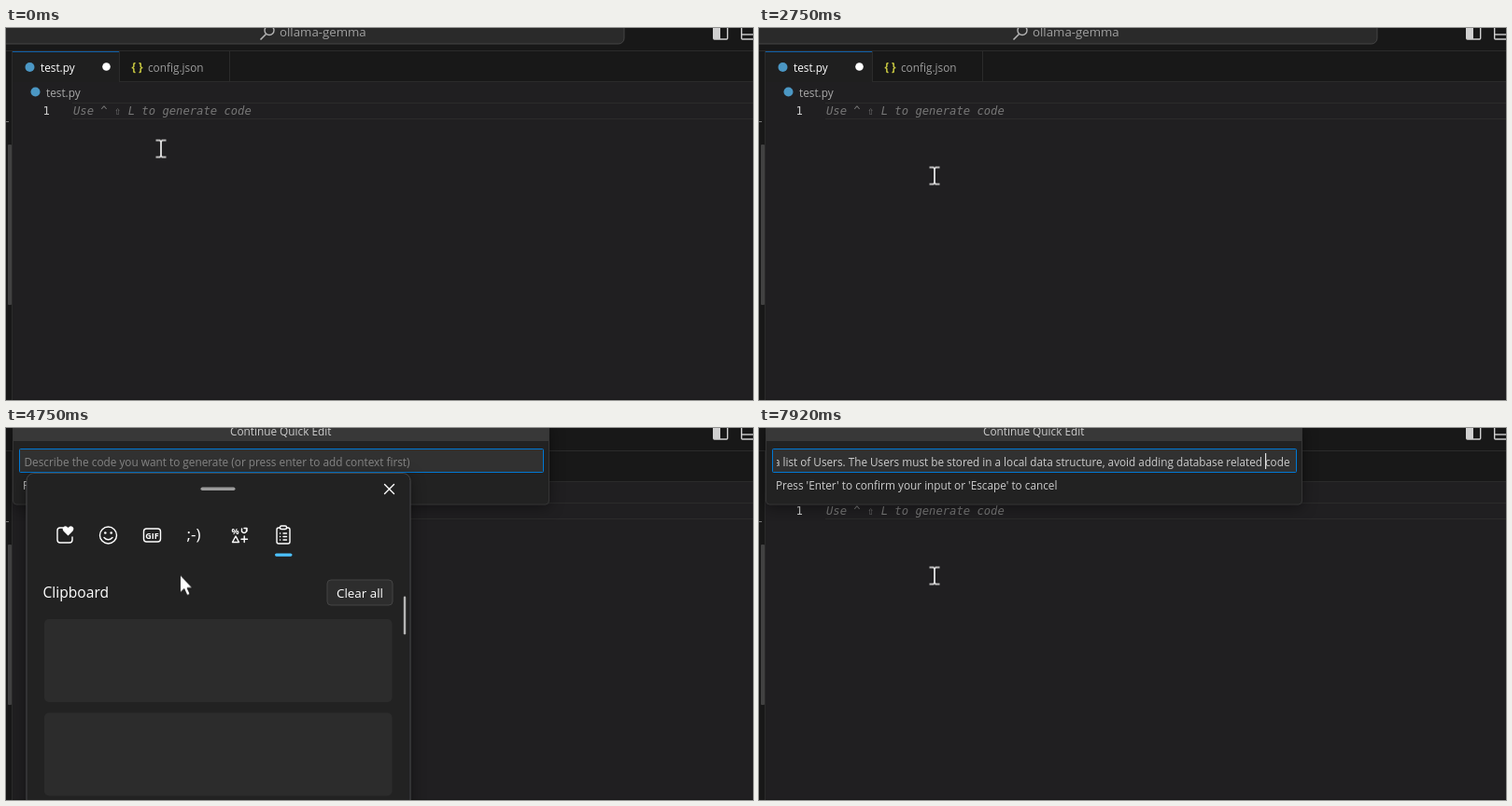
Write an HTML page that moves like this. It is 800 px wide and 399 px high and loops after 8 s.

```html
<!DOCTYPE html>
<html lang="en">
<head>
<meta charset="utf-8">
<title>Editor quick edit</title>
<style>
  html, body { margin: 0; width: 100%; height: 100%; overflow: hidden; background: #181818; }
  svg { display: block; width: 100%; height: 100%; }
  text { font: 11.8px "Open Sans", "Noto Sans", sans-serif; white-space: pre; }
  .mono { font-family: "DejaVu Sans Mono", monospace; font-size: 12.2px; }
  .line { fill: none; stroke: #fff; stroke-width: 1.4; stroke-linecap: round; stroke-linejoin: round; }
  .rule { fill: none; stroke: #2b2b2b; }

  .search, .dialog, .prompt, .pasted, .caret, .entries, .beam, .arrow { animation: 8s step-end infinite; }
  .search { animation-name: search; }
  .dialog { animation-name: dialog; }
  .prompt { animation-name: prompt; }
  .pasted { animation-name: pasted; }
  .caret { animation-name: caret; }
  .entries { animation-name: entries; }
  .beam { animation-name: beam; }
  .arrow { animation-name: arrow; }
  .panel { animation: panel 8s linear infinite; }
  .mouse { animation: mouse 8s ease-in-out infinite; }

  @keyframes search { 0% { opacity: 1 } 37.25%, 100% { opacity: 0 } }
  @keyframes dialog { 0% { opacity: 0 } 37.25%, 100% { opacity: 1 } }
  @keyframes prompt { 0% { opacity: 1 } 79.75%, 100% { opacity: 0 } }
  @keyframes pasted { 0% { opacity: 0 } 79.75%, 100% { opacity: 1 } }
  @keyframes entries { 0% { opacity: 0 } 64.625%, 100% { opacity: 1 } }
  @keyframes beam { 0% { opacity: 1 } 56.25% { opacity: 0 } 88.5%, 100% { opacity: 1 } }
  @keyframes arrow { 0% { opacity: 0 } 56.25% { opacity: 1 } 88.5%, 100% { opacity: 0 } }
  /* 500 ms blink, restarted by the paste and by the jump one word back */
  @keyframes caret {
    0%, 37.25%, 49.75%, 62.25%, 74.75% { opacity: 1; transform: none }
    43.5%, 56%, 68.5% { opacity: 0; transform: none }
    79.75% { opacity: 1; transform: translateX(549px) }
    86% { opacity: 0; transform: translateX(549px) }
    92.875%, 100% { opacity: 1; transform: translateX(522px) }
  }
  @keyframes panel {
    0%, 56.25% { opacity: 0; transform: translateY(30px) }
    58%, 88.49% { opacity: 1; transform: none }
    88.5%, 100% { opacity: 0; transform: none }
  }
  @keyframes mouse {
    0%, 23.75% { transform: translate(166px, 129.5px) }
    29.375%, 100% { transform: translate(188px, 158.5px) }
  }
</style>
</head>
<body>
<svg viewBox="0 0 800 399" preserveAspectRatio="none">
  <defs>
    <filter id="shadow" x="-20%" y="-20%" width="140%" height="140%">
      <feDropShadow dx="0" dy="3" stdDeviation="8" flood-color="#000" flood-opacity=".4"/>
    </filter>
    <clipPath id="field"><rect x="19.5" y="24" width="552" height="23"/></clipPath>
    <g id="more" fill="#fff">
      <circle cx="-4.5" r="1.2"/><circle r="1.2"/><circle cx="4.5" r="1.2"/>
    </g>
    <path id="pin" class="line" stroke-width="1.2" d="M1.5 -6 L6 -1.5 L2.5 1 L1 5 L-5 -1 L-1 -2.5Z M-2 2 L-6 6"/>
  </defs>

  <!-- window -->
  <rect width="800" height="399" fill="#181818"/>
  <g class="search">
    <rect x="-10" y="-10" width="672" height="27" rx="6" fill="#2a2a2a" stroke="#454545"/>
    <circle cx="282" cy="2.5" r="5" fill="none" stroke="#b5b5b5" stroke-width="1.4"/>
    <path d="M278.5 6.5 L272.5 12.5" stroke="#b5b5b5" stroke-width="1.6"/>
    <text x="293" y="9" fill="#a0a0a0" style="font-size:13.25px">ollama-gemma</text>
  </g>
  <g fill="none" stroke="#d0d0d0" stroke-width="1.4">
    <rect x="757.7" y="-4" width="15" height="16" rx="1"/>
    <rect x="787.7" y="-4" width="15" height="16" rx="1"/>
    <path d="M788 7 H800"/>
  </g>
  <rect x="758" y="-4" width="7" height="16" fill="#d0d0d0"/>

  <rect x="7" y="57" width="793" height="341" fill="#201f21"/>
  <path class="rule" d="M0 24.5 H800 M121.5 25 V57 M239.5 25 V57 M121 57.5 H800 M6.5 25 V399"/>
  <rect x="7" y="25" width="114" height="33" fill="#1f1f1f"/>
  <rect x="7" y="25" width="114" height="1" fill="#0f5fa8"/>
  <rect x="2" y="125" width="4" height="172" rx="1" fill="#414141"/>
  <rect y="100" width="3" height="1" fill="#777"/>

  <!-- tabs and editor -->
  <circle cx="25.5" cy="42" r="5" fill="#4b97c4"/>
  <text x="37" y="46.5" fill="#fff">test.py</text>
  <circle cx="107.5" cy="41.5" r="4.3" fill="#fff"/>
  <text x="134.5" y="45.5" fill="#cbcb41" style="font-size:11.5px;font-weight:700">{ }</text>
  <text x="152" y="46.5" fill="#9d9d9d">config.json</text>
  <circle cx="31.5" cy="68.5" r="5" fill="#4b97c4"/>
  <text x="43" y="73.5" fill="#a9a9a9">test.py</text>
  <path class="rule" d="M71 80.5 H800 M71 97.5 H800"/>
  <text class="mono" x="39.5" y="93" fill="#ccc">1</text>
  <text class="mono" x="72" y="93" fill="#777" font-style="italic" style="font-style:italic">Use ^ ⇧ L to generate code</text>

  <!-- quick edit -->
  <g class="dialog">
    <path d="M7.5 -6 H581.5 V78 Q581.5 82 577.5 82 H11.5 Q7.5 82 7.5 78Z" fill="#222" stroke="#353535" filter="url(#shadow)"/>
    <rect x="8" width="573" height="14" fill="#383838"/>
    <text x="240" y="8" fill="#ccc">Continue Quick Edit</text>
    <rect x="14.5" y="22.5" width="561" height="25" rx="1" fill="#313131" stroke="#0078d4"/>
    <g clip-path="url(#field)">
      <text class="prompt" x="19.5" y="40.5" fill="#868686">Describe the code you want to generate (or press enter to add context first)</text>
      <text class="pasted" x="568.5" y="40.5" fill="#ccc" text-anchor="end" style="font-size:11.75px">a list of Users. The Users must be stored in a local data structure, avoid adding database related code</text>
    </g>
    <rect class="caret" x="20" y="27" width="1.2" height="17" fill="#e0e0e0"/>
    <text x="18" y="66" fill="#ccc">Press 'Enter' to confirm your input or 'Escape' to cancel</text>
  </g>

  <!-- clipboard -->
  <g class="panel">
    <rect x="22" y="48.5" width="411" height="380" rx="8" fill="#212022" stroke="#474747" filter="url(#shadow)"/>
    <rect x="208.5" y="63.5" width="37" height="3.6" rx="1.8" fill="#9b9b9b"/>
    <path class="line" d="M405.5 60.5 L415.5 70.5 M415.5 60.5 L405.5 70.5"/>

    <path class="line" d="M61 107 H58 Q55 107 55 110 V120 Q55 123 58 123 H68 Q71 123 71 120 V117"/>
    <path d="M66.5 115.5 L61.5 110.5 Q59.5 107.5 62 105.8 Q64.5 104.5 66.5 107 Q68.5 104.5 71 105.8 Q73.5 107.5 71.5 110.5Z" fill="#fff"/>
    <circle class="line" cx="109.5" cy="115" r="9"/>
    <path class="line" d="M105 117.5 Q109.5 122 114 117.5"/>
    <circle cx="106.3" cy="112.5" r="1.3" fill="#fff"/><circle cx="112.7" cy="112.5" r="1.3" fill="#fff"/>
    <rect class="line" x="147.5" y="108" width="18" height="14" rx="3"/>
    <text x="156.5" y="118.5" fill="#fff" text-anchor="middle" style="font-size:9px;font-weight:700">GIF</text>
    <text x="193.5" y="120" fill="#fff" style="font-size:17px">;-)</text>
    <text x="241.5" y="113.5" fill="#fff" style="font-size:9px;font-weight:700">%</text>
    <path class="line" d="M252.5 108 V111 Q255 114 257.5 111 V109 M255 107.5 H258 V110.5 M246 116 L249.5 122.5 H242.5Z M252 119.3 H258.5 M255.2 116 V122.5"/>
    <rect class="line" x="290" y="107" width="14" height="17" rx="2"/>
    <rect class="line" x="293.5" y="105" width="7" height="3.5" rx="1.5" style="fill:#212022"/>
    <path class="line" d="M293.5 113 h.2 M297 113 H300.5 M293.5 116.5 h.2 M297 116.5 H300.5 M293.5 120 h.2 M297 120 H300.5"/>
    <rect x="288" y="134.5" width="18.5" height="3.2" rx="1.6" fill="#4cc2ff"/>

    <text x="39.5" y="182" fill="#fff" style="font-size:15.6px">Clipboard</text>
    <rect x="344" y="163" width="70" height="27" rx="4" fill="#2d2d2d" stroke="#444"/>
    <text x="354" y="182" fill="#fff" style="font-size:13.4px">Clear all</text>
    <rect x="425.8" y="180.5" width="2.4" height="41" rx="1.2" fill="#b5b5b5"/>
    <g fill="#2c2c2c">
      <rect x="41" y="205" width="372.5" height="89" rx="5"/>
      <rect x="41" y="305.5" width="372.5" height="89" rx="5"/>
    </g>
    <g class="entries" fill="#fff">
      <text x="51" y="234" style="font-size:15.2px">class User:</text>
      <text x="60.5" y="257.5" style="font-size:15.4px">def __init__(self, id, name, email):</text>
      <text x="87" y="280.5" style="font-size:15.9px">self.id = id</text>
      <text x="51" y="335" style="font-size:15px">http://localhost:11434</text>
      <use href="#more" x="391" y="227.5"/><use href="#pin" x="391" y="272"/>
      <use href="#more" x="391" y="328"/><use href="#pin" x="391" y="372"/>
    </g>
  </g>

  <g class="mouse">
    <path class="beam" d="M-5.5 -9 H-1.5 L0 -8 L1.5 -9 H5.5 M0 -8 V8 M-5.5 9 H-1.5 L0 8 L1.5 9 H5.5" fill="none" stroke="#f0f0f0" stroke-width="1.7"/>
    <path class="arrow" d="M-1.5 -1 V18 L2.8 14 L6 21 L9 19.5 L6 13 H11.5Z" fill="#fff" stroke="#111" stroke-width=".8"/>
  </g>
</svg>
</body>
</html>
```
